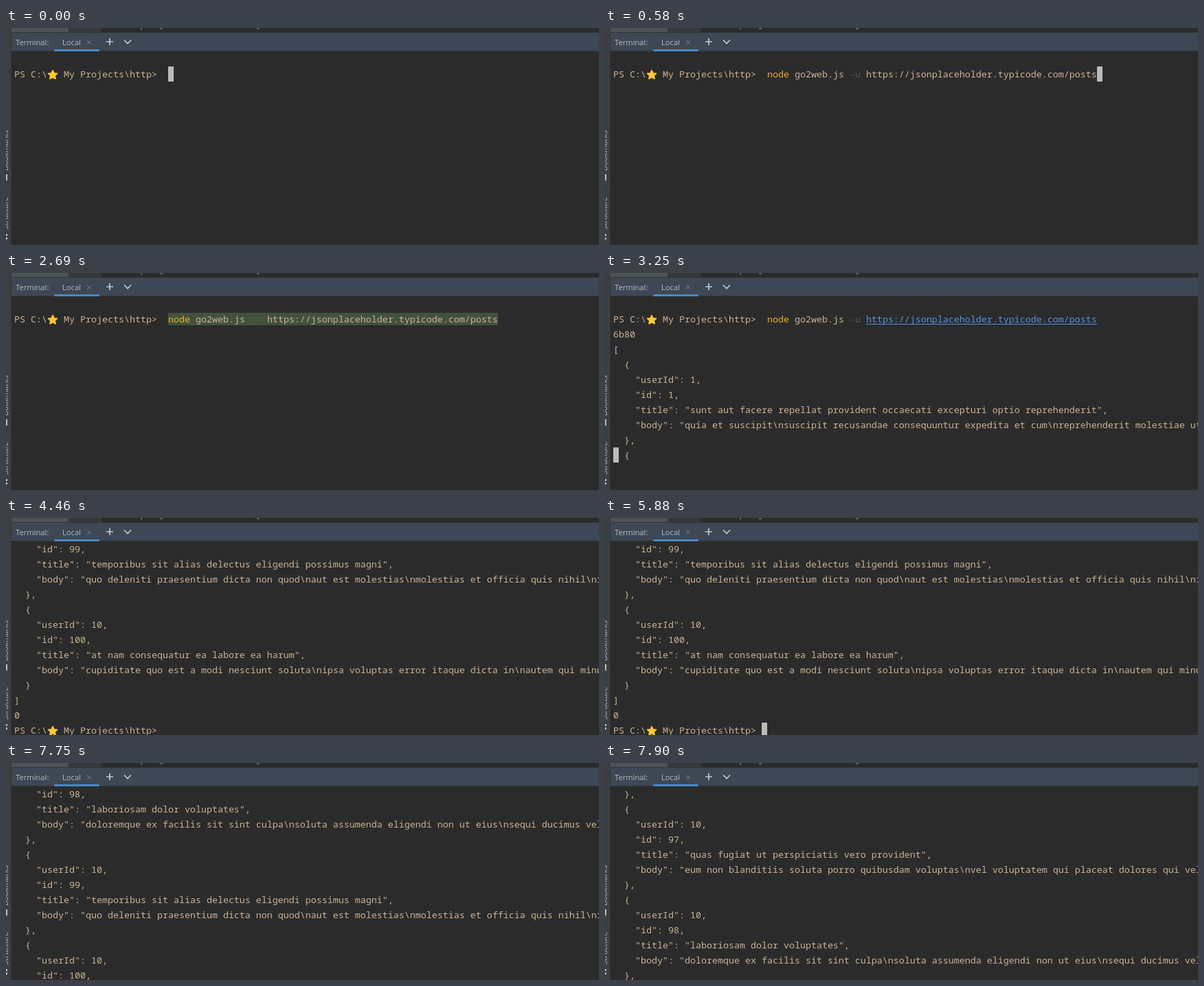
Animation, 863 px wide and 316 px high, one loop 8 s. Source, as an HTML page:

```html
<!DOCTYPE html>
<html lang="en">
<head>
<meta charset="utf-8">
<title>Terminal</title>
<style>
  html, body { margin: 0; width: 100%; height: 100%; overflow: hidden; background: #2b2b2b; }
  #stage { position: relative; width: 863px; height: 316px; overflow: hidden; }
  #chrome { position: absolute; left: 0; top: 0; font: 11.2px "Open Sans", "Noto Sans", sans-serif; }
  #screen {
    position: absolute; left: 12px; top: 34px; width: 851px; height: 282px; overflow: hidden;
    white-space: pre; color: #cbb294;
    font: 13.3333px/22px "Noto Sans Mono", "DejaVu Sans Mono", monospace;
    font-variant-ligatures: none;
  }
  #cursor { position: absolute; width: 8px; height: 22px; background: #bbb; }
  .star { width: 16px; height: 22px; vertical-align: top; }
  .cmd { color: #efb022; }
  .flag { color: #555; }
  .hl { background: #41523c; }
  .hl .flag { color: #50584c; }
  .link { color: #5394ec; text-decoration: underline 1px; text-underline-offset: 2px; text-decoration-skip-ink: none; }
</style>
</head>
<body>
<div id="stage">
  <svg id="chrome" width="863" height="316">
    <rect width="8" height="316" fill="#3c3f41"/>
    <rect x="7" y="7" width="1" height="309" fill="#323435"/>
    <rect x="8" width="83" height="6" fill="#4e5254"/>
    <rect x="91" width="48" height="6" fill="#36393b"/>
    <rect x="8" y="6" width="855" height="1" fill="#323232"/>
    <path d="M197 0v3M224 1h4M365 1h4" stroke="#8d949b"/>
    <rect x="8" y="7" width="855" height="27" fill="#3d4755"/>
    <rect x="8" y="33" width="855" height="1" fill="#323538"/>
    <rect x="70" y="31" width="66" height="3" rx="1.5" fill="#4a88c7"/>
    <g fill="#bbb">
      <text x="14" y="25">Terminal:</text>
      <text x="82" y="25">Local</text>
      <text transform="translate(3 208) rotate(-90)">Bookmarks</text>
      <text transform="translate(3 294) rotate(-90)">Structure</text>
      <path d="M0 213h2v10l-2-2zM0 300h2v3h-2zM0 305h2v3h-2z"/>
    </g>
    <path d="M118 18l6 6m0-6l-6 6" stroke="#737d87"/>
    <path d="M151 15v10M146 20h10M172 17.500l5 5 5-5" fill="none" stroke="#c4c8cc" stroke-width="1.7"/>
  </svg>
  <div id="screen"></div>
  <div id="cursor"></div>
</div>
<script>
const LOOP = 8000, CELL = 8, ROW = 22, LEFT = 12, TOP = 34;
const screen = document.getElementById("screen");
const cursor = document.getElementById("cursor");

const star = `<svg class="star" viewBox="0 0 16 22"><path d="M8 5.500l2 4.200 4.600.6-3.400 3.200.9 4.500-4.100-2.200-4.100 2.200.9-4.500-3.400-3.200 4.600-.6z" fill="#fcc832" stroke="#fcc832" stroke-width="1.500" stroke-linejoin="round"/></svg>`;
const prompt = String.raw`PS C:\ `.trim() + star + String.raw` My Projects\http&gt;`;
const url = "https://jsonplaceholder.typicode.com/posts";

const command = (outer, link) => `\n${prompt}  <span class="${outer}"><span class="cmd">node</span>` +
  ` go2web.js <span class="flag">-u</span> <span class="${link}">${url}</span></span>`;

const post = (user, id, title, body, end = ",") => `  {
    "userId": ${user},
    "id": ${id},
    "title": "${title}",
    "body": "${body}"
  }${end}`;

const first = post(1, 1, "sunt aut facere repellat provident occaecati excepturi optio reprehenderit",
  String.raw`quia et suscipit\nsuscipit recusandae consequuntur expedita et cum\nreprehenderit molestiae ut ut quas totam`);

const tail = [
  "  },",
  post(10, 97, "quas fugiat ut perspiciatis vero provident",
    String.raw`eum non blanditiis soluta porro quibusdam voluptas\nvel voluptatem qui placeat dolores qui velit aut`),
  post(10, 98, "laboriosam dolor voluptates",
    String.raw`doloremque ex facilis sit sint culpa\nsoluta assumenda eligendi non ut eius\nsequi ducimus vel quasi`),
  post(10, 99, "temporibus sit alias delectus eligendi possimus magni",
    String.raw`quo deleniti praesentium dicta non quod\naut est molestias\nmolestias et officia quis nihil\nitaque dolorem`),
  post(10, 100, "at nam consequatur ea labore ea harum",
    String.raw`cupiditate quo est a modi nesciunt soluta\nipsa voluptas error itaque dicta in\nautem qui minus magnam`, ""),
  "]", "0", prompt
].join("\n").split("\n");

const scrolled = top => tail.slice(top, top + 13).join("\n");

// Screen states: start time, text, cursor column and row
const states = [
  [0, "\n" + prompt, 28, 1],
  [580, command("", ""), 88, 1],
  [860, command("hl", ""), 88, 1],
  [3250, [command("", "link"), "6b80", "[", first, "  {"].join("\n"), 0, 10],
  [3370, scrolled(15), 27, 12],
  [6190, scrolled(12), 27, 15],
  [7750, scrolled(9), 27, 18],
  [7900, scrolled(0), 27, 27]
];
const blinks = [[0, 310], [580, 1570], [2160, 2690], [3250, 4460], [4890, 5450], [5880, 6190]];

let shown;
function draw(now) {
  const t = now % LOOP;
  const state = states.findLast(s => s[0] <= t);
  if (state !== shown) {
    shown = state;
    screen.innerHTML = state[1];
    cursor.style.left = LEFT + state[2] * CELL + "px";
    cursor.style.top = TOP + state[3] * ROW + "px";
  }
  cursor.hidden = !blinks.some(([on, off]) => t >= on && t < off);
}

const start = performance.now();
function tick() {
  draw(performance.now() - start);
  requestAnimationFrame(tick);
}
tick();
</script>
</body>
</html>
```
